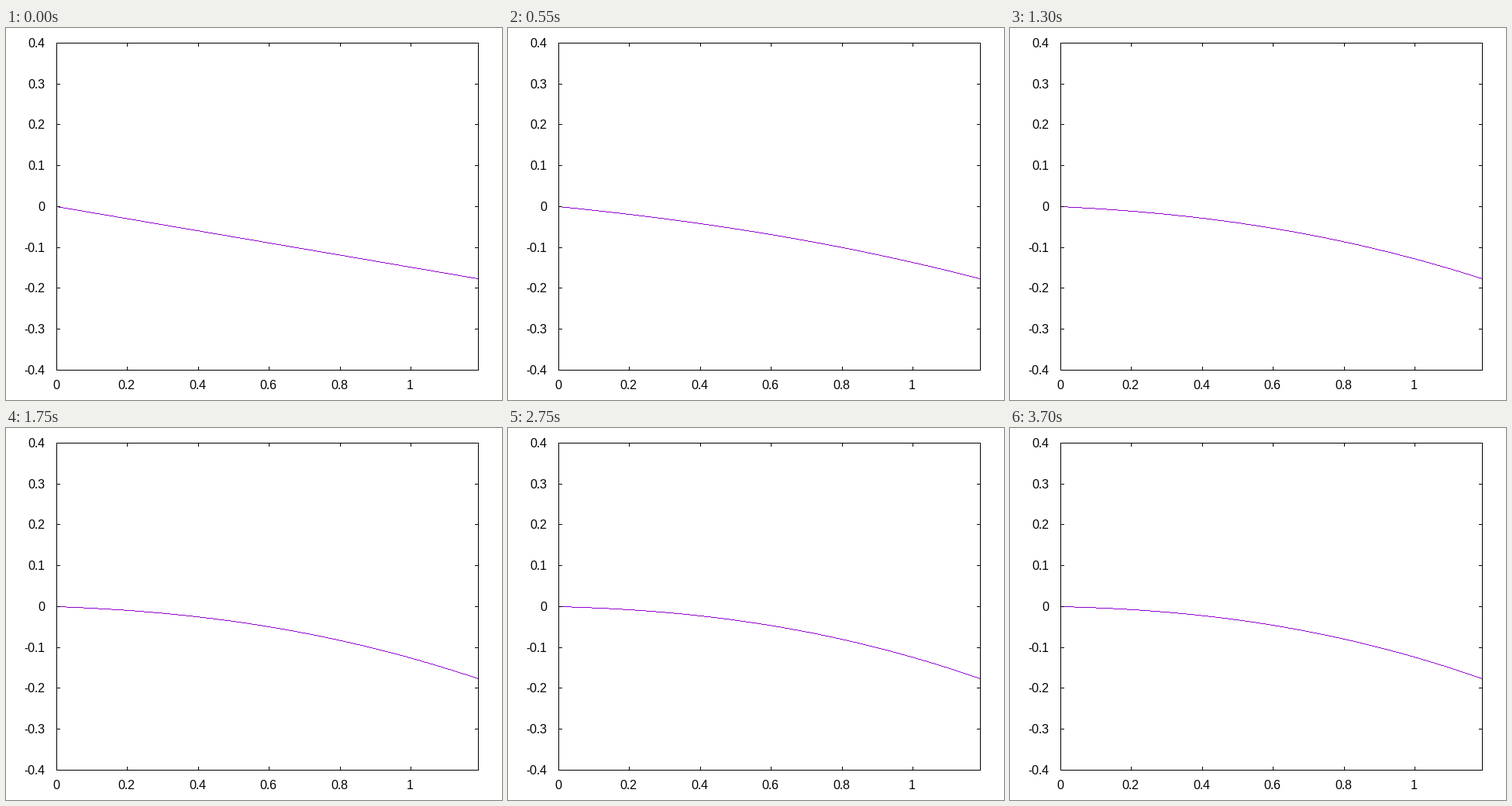
Recreate the animation shown at these times as a matplotlib script. Size 640x480 px, loop 3750 ms.

```python
import numpy as np
import matplotlib.pyplot as plt
from matplotlib.animation import FuncAnimation
from matplotlib.patches import Rectangle

W, H, DPI = 640, 480, 100
LEFT, RIGHT, TOP, BOTTOM = 65, 609, 19, 441
LENGTH, Y_MAX = 1.19, 0.4
END, SLOPE, POWER = -0.1765, -0.0225, 2.25
SLOW, FAST = 0.074, 0.45
FRAMES, INTERVAL = 75, 50
TIC = 4

plt.rcParams["font.family"] = "Liberation Sans"
plt.rcParams["text.hinting"] = "native"
plt.rcParams["text.hinting_factor"] = 1
fig = plt.figure(figsize=(W / DPI, H / DPI), dpi=DPI, facecolor="white")
ax = fig.add_axes([0, 0, 1, 1])
ax.axis("off")


def col(x):
    return LEFT + int(np.floor(x / LENGTH * (RIGHT - LEFT) + 0.5))


def row(y):
    up = (y + Y_MAX) / (2 * Y_MAX) * (BOTTOM - TOP)
    return BOTTOM - np.floor(up + 0.5).astype(int)


def block(x, y, w, h):
    ax.add_patch(Rectangle((x, y), w, h, facecolor="black", lw=0, zorder=3))


def label(x, y, value, align):
    ax.text(x, y, f"{value:g}", ha=align, va="baseline",
            fontsize=16 * 72 / DPI)


# border
for y in (TOP, BOTTOM):
    block(LEFT, y, RIGHT - LEFT + 1, 1)
for x in (LEFT, RIGHT):
    block(x, TOP, 1, BOTTOM - TOP + 1)

# tics and labels
for value in np.arange(-4, 5) / 10:
    y = row(value)
    block(LEFT, y, TIC + 1, 1)
    block(RIGHT - TIC, y, TIC + 1, 1)
    label(50, y + 6, value, "right")
for value in np.arange(6) / 5:
    x = col(value)
    block(x, TOP, 1, TIC + 1)
    block(x, BOTTOM - TIC, 1, TIC + 1)
    label(x - 0.5, 466, value, "center")

# a straight line relaxes to a sagging curve with both ends held
edges = np.arange(LEFT, RIGHT + 2)
xs = (edges[:-1] - LEFT) / (RIGHT - LEFT) * LENGTH
line = END * xs / LENGTH
rest = SLOPE * xs + (END - SLOPE * LENGTH) * (xs / LENGTH) ** POWER


def remaining(k):
    """Share of the way still to go, with a soft start."""
    return (FAST * np.exp(-SLOW * k) - SLOW * np.exp(-FAST * k)) / (FAST - SLOW)


start = row(line)
curve = ax.stairs(start + 1, edges, baseline=start, fill=True,
                  color="#9400d3", lw=0, zorder=2)
ax.set_xlim(0, W)
ax.set_ylim(H, 0)


def update(k):
    rows = row(rest + (line - rest) * remaining(k))
    curve.set_data(rows + 1, edges, rows)
    return (curve,)


anim = FuncAnimation(fig, update, frames=FRAMES, interval=INTERVAL,
                     repeat=True, repeat_delay=0)
plt.show()
```
